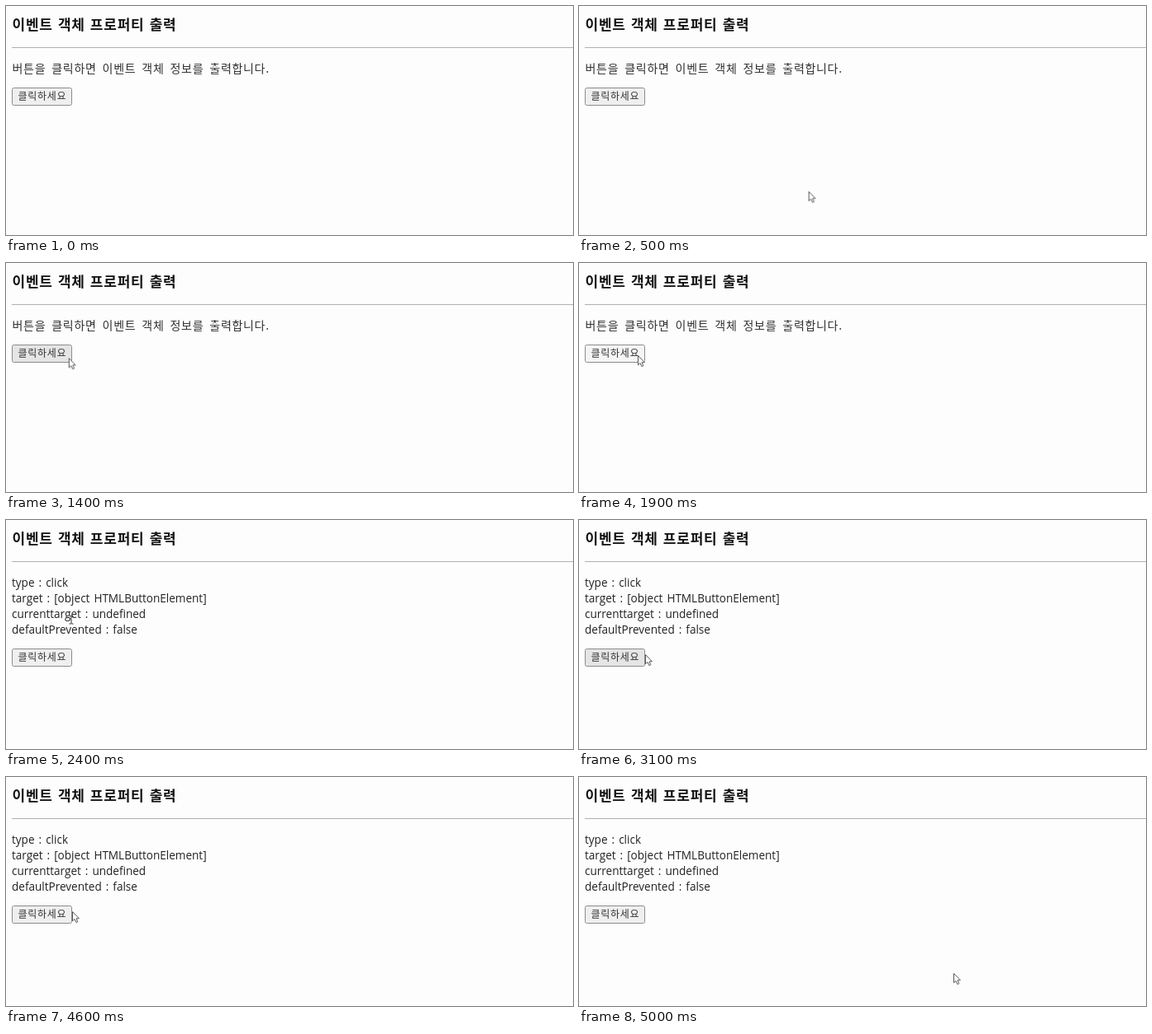
Animation, 686 px wide and 278 px high, one loop 5100 ms. Source, as an HTML page:

```html
<!DOCTYPE html>
<html lang="ko">
<head>
<meta charset="utf-8">
<title>이벤트 객체 프로퍼티 출력</title>
<style>
  html, body { margin: 0; width: 100%; height: 100%; overflow: hidden; background: #fdfdfd; }
  svg { display: block; width: 100%; height: 100%; }
  text { font-family: "Noto Sans CJK KR", "Noto Sans CJK", sans-serif; fill: #222; }
  .title { font-size: 17px; font-weight: 700; letter-spacing: .75px; word-spacing: .7px; fill: #141414; }
  .intro { font-size: 14px; letter-spacing: .7px; word-spacing: 2.4px; fill: #303030; }
  .result text { font: 13.55px "Open Sans", "Noto Sans", sans-serif; word-spacing: 1.5px; }
  .button text { font-size: 12px; letter-spacing: .7px; fill: #333; }
  .button rect { fill: #efefef; stroke: #8c8c8c; }

  /* The picture advances in 100 ms steps; 1% of the loop is 51 ms. */
  .intro, .result, .button, .face, .cursor, .arrow, .beam {
    animation: 5100ms step-end infinite;
  }
  .intro { animation-name: hide-on-click; }
  .result { animation-name: show-on-click; }
  .button { animation-name: push-down; }
  .button .face { animation-name: face; }
  .cursor { animation-name: travel; }
  .arrow { animation-name: arrow; }
  .beam { animation-name: beam; }

  @keyframes hide-on-click { 0% { opacity: 1 } 47.05%, 100% { opacity: 0 } }
  @keyframes show-on-click { 0% { opacity: 0 } 47.05%, 100% { opacity: 1 } }
  @keyframes push-down {
    0% { transform: none }
    47.05%, 100% { transform: translateY(57px) }
  }
  @keyframes face {
    0% { fill: #efefef }
    27.45% { fill: #e5e5e5 }
    35.29% { fill: #f5f5f5 }
    47.05% { fill: #efefef }
    60.78% { fill: #e5e5e5 }
    88.23% { fill: #f5f5f5 }
    90.19%, 100% { fill: #efefef }
  }
  @keyframes travel {
    0% { transform: translate(700px, 290px) }
    1.96% { transform: translate(640px, 264px); animation-timing-function: steps(5) }
    11.76% { transform: translate(187px, 215px); animation-timing-function: steps(2) }
    15.68% { transform: translate(115px, 178px); animation-timing-function: steps(2) }
    19.6% { transform: translate(90px, 125px) }
    21.56% { transform: translate(90px, 125px); animation-timing-function: steps(4) }
    29.41% { transform: translate(71px, 112px) }
    47.05% { transform: translate(79px, 121px); animation-timing-function: steps(5) }
    56.86% { transform: translate(94px, 124px); animation-timing-function: steps(2) }
    60.78% { transform: translate(80px, 163px) }
    92.15% { transform: translate(80px, 163px); animation-timing-function: steps(3) }
    98.03%, 100% { transform: translate(453px, 238px) }
  }
  @keyframes arrow {
    0% { opacity: 0 }
    1.96% { opacity: 1 }
    47.05% { opacity: 0 }
    58.82%, 100% { opacity: 1 }
  }
  @keyframes beam {
    0% { opacity: 0 }
    47.05% { opacity: 1 }
    58.82%, 100% { opacity: 0 }
  }
</style>
</head>
<body>
<svg viewBox="0 0 686 278">
  <text class="title" x="7.5" y="28.5">이벤트 객체 프로퍼티 출력</text>
  <path d="M7 50.5H686" stroke="#b0b0b0"/>

  <text class="intro" x="7.5" y="80.5">버튼을 클릭하면 이벤트 객체 정보를 출력합니다.</text>
  <g class="result">
    <text x="7" y="81">type : click</text>
    <text x="7" y="100">target : [object HTMLButtonElement]</text>
    <text x="7" y="119">currenttarget : undefined</text>
    <text x="7" y="138">defaultPrevented : false</text>
  </g>

  <g class="button">
    <rect class="face" x="7.5" y="99.5" width="72" height="21" rx="2"/>
    <text x="14.5" y="114.3">클릭하세요</text>
  </g>

  <g class="cursor">
    <path class="arrow" d="M.5 .5V11.8L3 9.5 4.9 13.6 6.8 12.8 5 8.8H8.4Z" fill="#fff" stroke="#585858"/>
    <path class="beam" d="M-2.5 -4.5H-.8L0 -4 .8 -4.5H2.5M0 -4V4.5M-2.5 5H-.8L0 4.5 .8 5H2.5" fill="none" stroke="#333"/>
  </g>
</svg>
</body>
</html>
```
